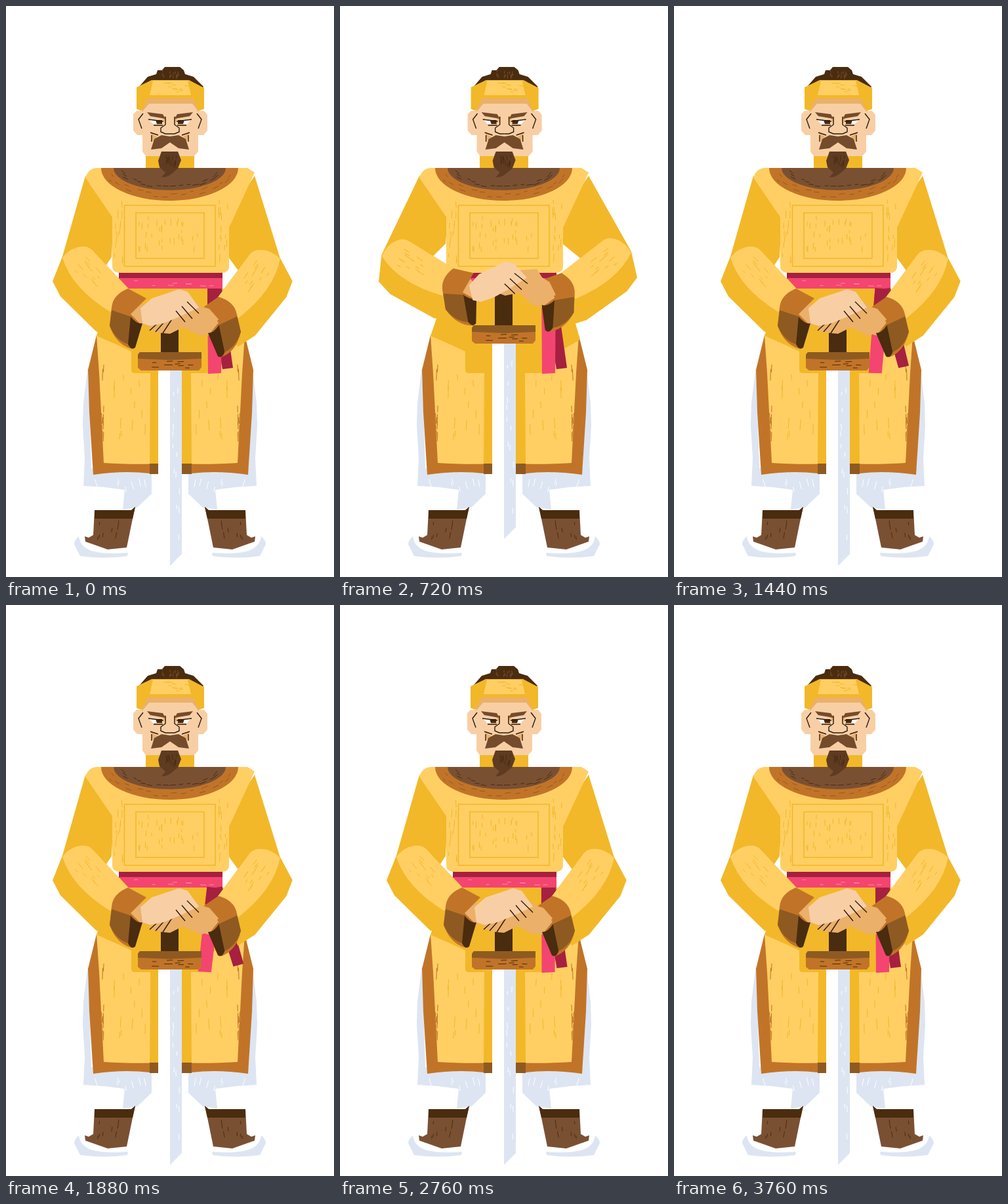
Animation of 500 by 871 pixels, one loop 3800 ms. Source, as an HTML page:

```html
<!DOCTYPE html>
<html lang="en">
<head>
<meta charset="utf-8">
<title>Swordsman</title>
<style>
  html, body { margin: 0; width: 100%; height: 100%; overflow: hidden; background: #fff; }
  svg { display: block; width: 500px; height: 871px; }
  .light { fill: #ffcf63; } .gold { fill: #f2b829; } .rust { fill: #c17428; }
  .umber { fill: #8e5a22; } .dark { fill: #4a2c0e; } .brown { fill: #7a5033; }
  .skin { fill: #f8cfa4; } .tan { fill: #ebb06a; } .pink { fill: #f3456f; }
  .wine { fill: #a6203f; } .ice { fill: #dde5f2; } .white { fill: #fff; }
  .line { fill: none; stroke: #f2b829; stroke-width: 1.6; }
  .ink { fill: none; stroke: #2b1a10; stroke-width: 1.4; }
  .mark { fill: none; stroke-linecap: round; }
</style>
</head>
<body>
<svg viewBox="0 0 500 871">
  <defs>
    <!-- Origin at the cuff -->
    <g id="forearm">
      <path class="gold" d="M-97-96L-112-58L-100-35L-46 18L-18 32L5-45L-50-104Z"/>
      <path class="light" d="M-97-94Q-83-112-63-111Q-55-110-50-104L5-45L-13-8L-25-12Q-83-48-97-94Z"/>
      <g id="sleeveMarks"></g>
      <path class="tan" d="M5-15L23-26L39 4L24 10L9-2Z"/>
      <path class="rust" d="M3-47Q-20-38-22-18L-25 10Q-15 39 9 45L24 9L7-8L31-32Z"/>
      <path class="umber" d="M-22-14L8-4L4 38Q-15 33-25 10Z"/>
      <path class="dark" d="M7-4Q17 8 25 6L14 43Q8 48 3 38Z"/>
    </g>
  </defs>

  <g id="leg">
    <path class="ice" d="M125 550L118 605L117 640L120 690L118 732L150 734L181 738L178 768L200 765L222 744V705H130Z"/>
    <path class="brown" d="M135 769H191L197 764L193 782L184 826L155 829L121 817L120 809L126 811L133 807Z"/>
    <path class="dark" d="M135 769H191L197 764L193 782H135Z"/>
    <path class="ice" d="M111 809Q104 815 104 821L113 839Q150 844 185 839L186 834Q150 837 130 831Q113 825 111 809Z"/>
  </g>
  <use href="#leg" transform="matrix(-1 0 0 1 500 0)"/>

  <g id="skirt">
    <path class="rust" d="M138 502L125 555L127 620L133 715Q180 708 219 713H251V502Z"/>
    <path class="light" d="M138 502L142 560L149 697Q190 700 251 698V502Z"/>
    <path class="gold" d="M220 555H251V698H219Z"/>
    <path class="umber" d="M219 698H251V714H219Z"/>
  </g>
  <use href="#skirt" transform="matrix(-1 0 0 1 502 0)"/>
  <path class="gold" d="M172 410H330V430L355 470L366 509L345 521L311 530L310 560H196Q191 560 191 555V527L172 518L138 503L150 468L172 430Z"/>

  <path id="leftUpper" class="gold"/>
  <path id="rightUpper" class="gold"/>

  <path class="wine" d="M172 404H330V416H172Z"/>
  <path class="pink" d="M172 415H330V431H187Z"/>
  <path id="sashBack" class="wine" d="M308 431H329L346 552L330 554Z"/>
  <g id="sashFront">
    <path class="pink" d="M307 431H329L328 560L308 561Z"/>
    <path class="wine" d="M307 431H329V458H307Z"/>
  </g>

  <path class="light" d="M121 262Q125 248 138 247H368L379 254L340 338V397Q340 407 328 407H175Q162 407 162 397V322Z"/>
  <path class="line" d="M180.5 304H319V397H180.5ZM198 315.5H302V385H198Z"/>
  <path class="rust" d="M145 247A104.5 50 0 0 0 354 247Z"/>
  <path class="brown" d="M164 247A85.5 34 0 0 0 335 247Z"/>
  <g id="bodyMarks"></g>

  <path class="gold" d="M213 228H287V247H213Z"/>
  <g id="head">
    <path class="dark" d="M203 123L216 108L229 104L231 98H238L242 93H265L271 98L273 104L286 108L301 123L290 140H210Z"/>
    <path class="skin" d="M207 140H294V160H302L307 166V190L301 197H293V222L287 229H213L208 222V197H200L194 190V165L199 160H207Z"/>
    <path class="tan" d="M214 141H287L294 153V162L284 149H218L207 162V153Z"/>
    <path class="gold" d="M199 124L222 113H279L302 125V157L294 160L285 141H216L206 160L199 157Z"/>
    <path class="light" d="M224 114H277L282 136H219Z"/>
    <g id="faceHalf">
      <path class="tan" d="M221 194L231 200L224 206ZM236 168H244V180Z"/>
      <path class="white" d="M218 173L238 176L237 180H224Z"/>
      <path class="dark" d="M228 174H238V180H230Z"/>
      <path fill="#744b2b" d="M215 162L239 165L243 172L220 168Z"/>
      <path class="ink" d="M217 173L240 176M225 182H239M243 169V181L236 186V192L243 195H250M220 193L232 197M222 197V207M209 164L202 173L207 187"/>
    </g>
    <use href="#faceHalf" transform="matrix(-1 0 0 1 500 0)"/>
    <path fill="#744b2b" d="M221 219L226 203L237 197L250 199L263 197L274 203L279 219L263 217L250 208L237 217Z"/>
    <path fill="#5f3b22" d="M237 222H262L267 235L262 248L251 257Q244 262 237 261L243 254L234 246L232 236Z"/>
    <g id="hairMarks"></g>
  </g>

  <g id="sword">
    <path class="white" d="M232 550H251V854L232 836Z"/>
    <path class="ice" d="M250 550H268V836L250 854Z"/>
    <path class="dark" d="M236 476H263V530H236Z"/>
    <path class="rust" d="M204 528H298V551L294 556H206L201 552V532Z"/>
    <path class="umber" d="M204 528H298V538L250 540L201 538V532Z"/>
    <g id="swordMarks"></g>
  </g>

  <use id="leftArm" href="#forearm"/>
  <use id="rightArm" href="#forearm"/>
  <g id="rightHand">
    <path class="tan" d="M-80-30L-46-42L-35-32L-22-28L-8-12L-26 10L-36 13L-62 0L-82 10L-103 8L-115 1Z"/>
    <path class="ink" d="M-113 5L-102-5M-104 7L-90-9M-93 9L-78-14"/>
  </g>
  <g id="leftHand">
    <path class="skin" d="M-30 1L-13-14L29-28L42-24L59 0L27 15L5 24L-15 28L-27 24Z"/>
    <path class="ink" d="M24 5L38 22M33-2L49 17M41-9L59 9"/>
  </g>
</svg>
<script>
const $ = id => document.getElementById(id);
const set = (id, name, value) => $(id).setAttribute(name, value);

// Brush marks scattered over a box around (x, y)
let seed = 7;
const random = () => (seed = seed * 16807 % 2147483647) / 2147483647;
function scatter(group, color, x, y, w, h, count, length, angle = Math.PI / 2) {
  let d = '';
  for (let i = 0; i < count; i++) {
    const a = angle + (random() - .5) * .15, l = length * (.4 + random() * .6);
    d += `M${x + (random() - .5) * w} ${y + (random() - .5) * h}l${Math.cos(a) * l} ${Math.sin(a) * l}`;
  }
  $(group).insertAdjacentHTML('beforeend', `<path class="mark" stroke="${color}" d="${d}"/>`);
}
function collarMarks(color, rx, ry) {
  for (let a = .25; a < 2.9; a += .15) {
    const r = .92 + random() * .16;
    scatter('bodyMarks', color, 249.5 + Math.cos(a) * rx * r, 247 + Math.sin(a) * ry * r, 0, 0, 1, 10,
      Math.atan2(Math.cos(a) * ry, -Math.sin(a) * rx));
  }
}

const GOLD = '#f2b829', RUST = '#c17428', DARK = '#4a2c0e', WHITE = '#fff';
scatter('bodyMarks', GOLD, 250, 344, 96, 56, 34, 9);
for (const x of [171, 331]) scatter('bodyMarks', GOLD, x, 340, 14, 90, 14, 12);
scatter('bodyMarks', '#ff8ba5', 255, 423, 120, 8, 8, 9, 0);
scatter('skirt', GOLD, 185, 610, 60, 100, 12, 18);
scatter('skirt', RUST, 147, 610, 5, 140, 10, 20);
scatter('leg', WHITE, 172, 726, 85, 16, 9, 12, 1.3);
scatter('leg', DARK, 160, 800, 40, 30, 8, 9, 1.7);
scatter('hairMarks', '#7a5033', 250, 102, 38, 10, 14, 5);
scatter('hairMarks', DARK, 250, 235, 20, 16, 16, 8);
scatter('hairMarks', GOLD, 250, 124, 48, 14, 10, 8, .1);
scatter('swordMarks', WHITE, 259, 700, 11, 240, 13, 10);
scatter('swordMarks', DARK, 245, 547, 66, 10, 9, 12, 0);
scatter('sleeveMarks', GOLD, -60, -75, 40, 40, 12, 11, .85);
collarMarks(DARK, 78, 28);
collarMarks('#8e5a22', 95, 42);

const smooth = p => (1 - Math.cos(Math.PI * p)) / 2;

// Slow raise, then an accelerating drop
function liftAt(t) {
  if (t < 490 || t > 1235) return 0;
  return 84 * (t < 960 ? smooth((t - 490) / 470) : 1 - ((t - 960) / 275) ** 2);
}

// Sideways shift of the sash hem, dying away after the impact
function swingAt(t) {
  const s = t - 1350;
  return s < 0 || s > 2100 ? 0 : -30 * Math.sin(Math.PI * s / 700) * (1 - s / 2100);
}

// Upper arm from the shoulder to the posed forearm; side is 1 for left, -1 for right
function upperArm(side, k, x, y, degrees) {
  const a = degrees * Math.PI / 180, c = Math.cos(a), s = Math.sin(a);
  const onForearm = (u, v) => [x + side * (u * c - v * s), y + u * s + v * c];
  const onBody = (u, v) => [250 + side * (u - 250), v];
  return 'M' + [onBody(121, 259), onForearm(-97, -96), onForearm(-45, -60),
    onBody(161, 383 - 33 * k), onBody(164, 322)].join('L') + 'Z';
}

function frame() {
  const t = performance.now() % 3800, lift = liftAt(t), k = lift / 66, swing = swingAt(t);
  const turn = 25 * k;
  const left = [183 - k, 478 - 51 * k], right = [332 + 2 * k, 490 - 58 * k];
  set('leftUpper', 'd', upperArm(1, k, ...left, -turn));
  set('rightUpper', 'd', upperArm(-1, k, ...right, 6.5 - turn));
  set('leftArm', 'transform', `translate(${left}) rotate(${-turn})`);
  set('rightArm', 'transform', `translate(${right}) scale(-1 1) rotate(${6.5 - turn})`);
  set('rightHand', 'transform', `translate(${right}) rotate(${turn})`);
  set('leftHand', 'transform', `translate(${235 - 14 * k} ${460 - 62 * k}) rotate(${-11 * k})`);
  set('sword', 'transform', `translate(0 ${-lift})`);
  set('head', 'transform', `translate(${k} 0)`);
  set('sashFront', 'transform', `rotate(${-.42 * swing} 318 425)`);
  set('sashBack', 'transform', `rotate(${.48 * swing} 318 425)`);
  requestAnimationFrame(frame);
}
frame();
</script>
</body>
</html>
```
